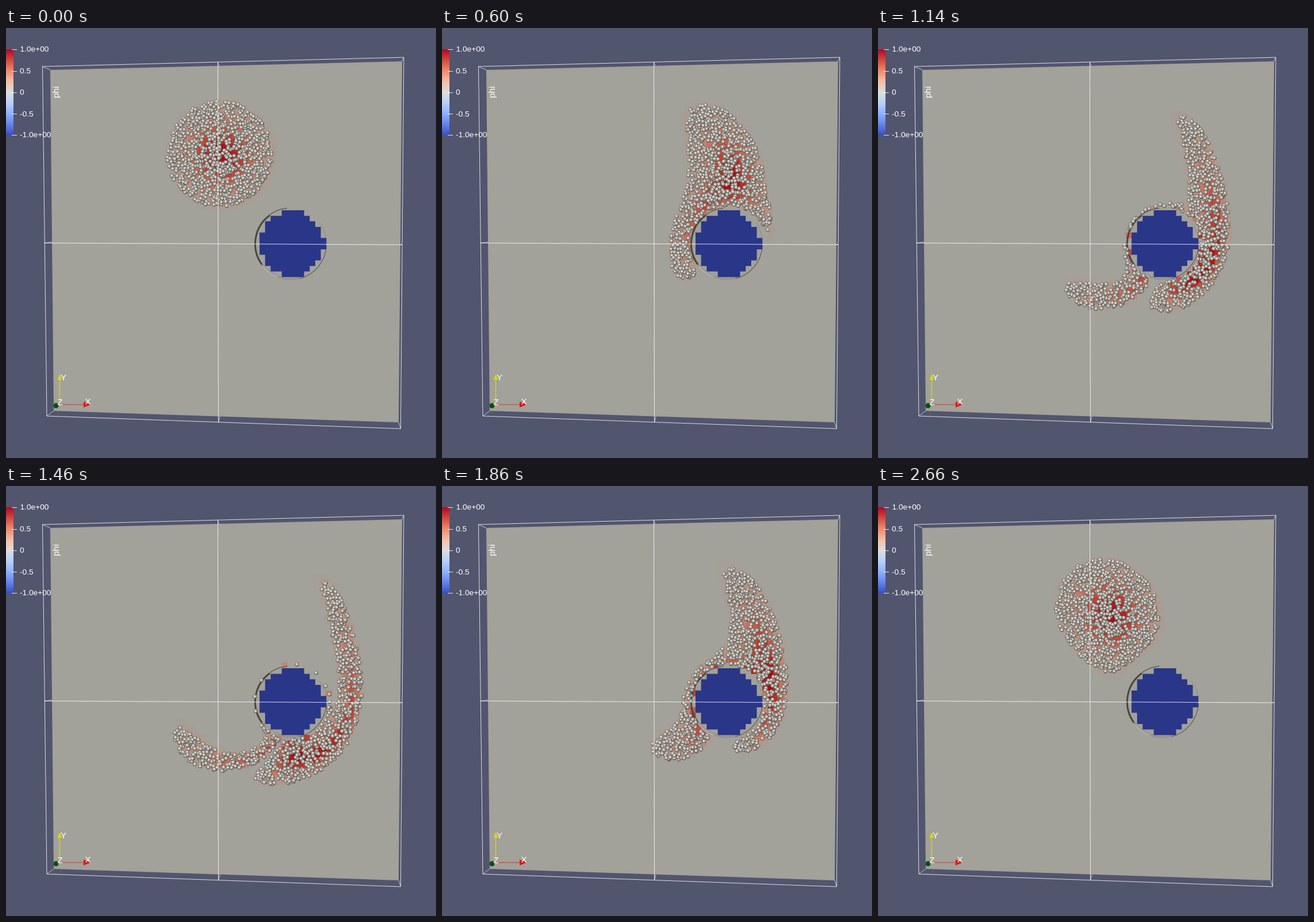
An HTML page with a canvas for the animation above (2.73 s loop, 748 px wide and 748 px high).

```html
<!DOCTYPE html>
<html lang="en">
<head>
<meta charset="utf-8">
<title>phi</title>
<style>
html, body { margin: 0; width: 100%; height: 100%; overflow: hidden; background: #52556e; }
canvas, svg { position: absolute; left: 0; top: 0; width: 748px; height: 748px; display: block; }
text { font-family: "Liberation Sans", Arial, sans-serif; fill: #fff; }
</style>
</head>
<body>
<canvas id="stage" width="748" height="748"></canvas>
<svg viewBox="0 0 748 748">
  <defs>
    <linearGradient id="map" x1="0" y1="0" x2="0" y2="1">
      <stop offset="0" stop-color="#b40426"/>
      <stop offset=".12" stop-color="#d0473d"/>
      <stop offset=".25" stop-color="#f08a6c"/>
      <stop offset=".38" stop-color="#f3c0a8"/>
      <stop offset=".5" stop-color="#dddddd"/>
      <stop offset=".62" stop-color="#b9d0f9"/>
      <stop offset=".75" stop-color="#8db0fe"/>
      <stop offset=".88" stop-color="#6180e9"/>
      <stop offset="1" stop-color="#3b4cc0"/>
    </linearGradient>
  </defs>
  <g fill="none" stroke="#fff" stroke-width="1" stroke-opacity=".8">
    <path d="M63.5 67L692 51L686.500 697L71 675Z"/>
    <path d="M63.5 67L77 73M692 51L689 58M686.500 697L683 686M71 675L83 666" stroke-opacity=".65"/>
    <path d="M368.500 59L369.500 686M67 374L689 377"/>
    <path d="M368 59L371 66M67 374L80 372.500M689 377L685 376M369.500 686L372 676" stroke-opacity=".7"/>
  </g>
  <rect x="0" y="37" width="13" height="150" fill="url(#map)"/>
  <path d="M10 37.500H19M10 75.500H19M10 112.500H19M10 149.500H19M10 186.500H19" stroke="#fff" stroke-opacity=".85"/>
  <g font-size="13.7">
    <text x="24.500" y="40.500">1.0e+00</text>
    <text x="24" y="79">0.5</text>
    <text x="24" y="116">0</text>
    <text x="24" y="153.500">-0.5</text>
    <text x="24" y="189.500">-1.0e+00</text>
    <text font-size="15.500" transform="translate(92 122) rotate(-90)">phi</text>
  </g>
  <path d="M93.500 652V611" stroke="#d6d62a" stroke-width="1.200"/>
  <path d="M89.500 612L93.500 602L97.500 612Z" fill="#d8d80c"/>
  <path d="M91 655H136" stroke="#e03030" stroke-width="1.200"/>
  <path d="M135 650L147 655L135 660Z" fill="#e31010"/>
  <circle cx="87" cy="657" r="4.500" fill="#0b4f12"/>
  <g font-size="15">
    <text x="95" y="613">Y</text>
    <text x="137.500" y="655">X</text>
    <text x="89.500" y="656">Z</text>
  </g>
</svg>
<script>
const ctx = document.getElementById("stage").getContext("2d");
const PI = Math.PI, LOOP = 2730, TURN = 21;
const BALLS = 840, BALL_R = 3.7;
const CELL = 9.66, OBST_X = 0.7, OBST_Y = 0.5, OBST_R = 0.1;

let seed = 20417;
function rand() {
  seed = (seed + 0x6d2b79f5) | 0;
  let z = Math.imul(seed ^ (seed >>> 15), 1 | seed);
  z = (z + Math.imul(z ^ (z >>> 7), 61 | z)) ^ z;
  return ((z ^ (z >>> 14)) >>> 0) / 4294967296;
}

// Clockwise vortex in the unit square, plus a doublet that makes the round
// obstacle a streamline, plus its mirror images in the four walls.
const SLOPE = 0.995 * OBST_R ** 2, BEND = 0.543 * OBST_R ** 4;
const doublets = [];
for (const x of [-OBST_X, OBST_X, 2 - OBST_X]) {
  for (const y of [-OBST_Y, OBST_Y, 2 - OBST_Y]) {
    doublets.push({ x, y, k: y === OBST_Y ? SLOPE : -SLOPE });
  }
}

function flow(x, y) {
  let u = -(Math.sin(PI * x) ** 2) * Math.sin(2 * PI * y);
  let v = Math.sin(2 * PI * x) * Math.sin(PI * y) ** 2;
  for (const d of doublets) {
    const X = x - d.x, Y = y - d.y;
    const r2 = Math.max(X * X + Y * Y, 0.009), s = d.k / (r2 * r2);
    u += 2 * X * Y * s;
    v += (Y * Y - X * X) * s;
  }
  const X = x - OBST_X, Y = y - OBST_Y;
  const bend = 2 * BEND / Math.max(X * X + Y * Y, 0.009) ** 3;
  return [
    u + bend * Y * (Y * Y - 3 * X * X),
    v + bend * X * (X * X - 3 * Y * Y)
  ];
}

function move([x, y], span) {
  const n = 3, h = span / n;
  for (let i = 0; i < n; i++) {
    const a = flow(x, y);
    const b = flow(x + a[0] * h / 2, y + a[1] * h / 2);
    const c = flow(x + b[0] * h / 2, y + b[1] * h / 2);
    const d = flow(x + c[0] * h, y + c[1] * h);
    x += h / 6 * (a[0] + 2 * b[0] + 2 * c[0] + d[0]);
    y += h / 6 * (a[1] + 2 * b[1] + 2 * c[1] + d[1]);
    const X = x - OBST_X, Y = y - OBST_Y, r = Math.hypot(X, Y);
    if (r < OBST_R) {
      x = OBST_X + X * OBST_R / r;
      y = OBST_Y + Y * OBST_R / r;
    }
  }
  return [x, y];
}

const tau = k => 0.0292 * k + 0.00017 * k * k;

// All states of a set of points, carried forward (+1) or back (-1).
function carry(points, dir) {
  const out = [points];
  for (let k = 1; k <= TURN; k++) {
    const span = dir * (tau(k) - tau(k - 1));
    out.push(out[k - 1].map(p => move(p, span)));
  }
  return out;
}

function scatter() {
  const list = [];
  while (list.length < BALLS) {
    const r = 0.146 * Math.sqrt(rand()), a = 2 * PI * rand();
    const x = 0.5 + r * Math.cos(a), y = 0.75 + r * Math.sin(a);
    if (list.every(p => Math.hypot(p[0] - x, p[1] - y) > 0.0042)) list.push([x, y]);
  }
  return list;
}

const cells = [], solid = [];
for (let m = -24; m < 28; m++) {
  for (let j = -26; j < 19; j++) {
    const spot = { x: 499 + CELL * j, y: 375 - CELL * (m + 1) };
    if ((j + 0.7) ** 2 + (m + 0.5) ** 2 < 33.5) solid.push(spot);
    else cells.push({ ...spot, p: [OBST_X + (j + 0.5) / 64, OBST_Y + (m + 0.5) / 64] });
  }
}

const balls = carry(scatter(), 1);
const origins = carry(cells.map(c => c.p), -1);

const RAMP = [[162, 161, 154], [187, 146, 130], [199, 111, 90], [187, 56, 46], [164, 12, 21]];
function tint(v) {
  const s = Math.min(v, 0.999) * 4, i = Math.floor(s), f = s - i;
  return "rgb(" + RAMP[i].map((c, n) => Math.round(c + (RAMP[i + 1][n] - c) * f)) + ")";
}

function makeBall() {
  const c = document.createElement("canvas"), g = c.getContext("2d");
  c.width = c.height = 32;
  const grad = g.createRadialGradient(14, 12.5, 0, 15.5, 15.5, 16);
  grad.addColorStop(0, "#efece6");
  grad.addColorStop(0.42, "#c8c4bc");
  grad.addColorStop(0.78, "#86827b");
  grad.addColorStop(1, "#474440");
  g.fillStyle = grad;
  g.arc(16, 16, 15.5, 0, 2 * PI);
  g.fill();
  return c;
}
const ball = makeBall();

function arc(from, to, width, color) {
  ctx.beginPath();
  ctx.arc(495, 375.5, 63 - width / 2, from * PI, to * PI);
  ctx.lineWidth = width;
  ctx.strokeStyle = color;
  ctx.stroke();
}

function fillCells(list, color) {
  ctx.fillStyle = color;
  ctx.beginPath();
  list.forEach(c => ctx.rect(c.x, c.y, CELL + 0.3, CELL + 0.3));
  ctx.fill();
}

function draw(k) {
  ctx.fillStyle = "#52556e";
  ctx.fillRect(0, 0, 748, 748);
  ctx.fillStyle = "#a2a19a";
  ctx.beginPath();
  [[77, 73], [689, 58], [683, 686], [83, 666]].forEach(p => ctx.lineTo(...p));
  ctx.fill();

  cells.forEach((c, n) => {
    const [x, y] = origins[k][n];
    const phi = 1.12 * (1 - Math.hypot(x - 0.5, y - 0.75) / 0.16);
    if (phi > 0.01) fillCells([c], tint(phi));
  });

  arc(0.4, 0.8, 4, "#96948d");
  arc(0.62, 0.78, 2, "#b4b2aa");
  arc(0.8, 1.3, 3, "#484641");
  arc(1.28, 1.47, 1.2, "#56544f");
  arc(1.8, 2, 0.7, "#85837c");
  arc(0.02, 0.42, 1.1, "#5a5852");
  fillCells(solid, "#2a3688");

  for (const [x, y] of balls[k]) {
    const px = 371.5 + 627 * (x - 0.5), py = 375.5 - 627 * (y - 0.5);
    ctx.drawImage(ball, px - BALL_R, py - BALL_R, 2 * BALL_R, 2 * BALL_R);
  }
}

// 15 pictures a second on a 20 ms clock; the flow reverses at TURN.
let shown = -1;
function tick() {
  const t = performance.now() % LOOP;
  const i = Math.min(40, Math.floor((Math.floor(t / 20) + 0.5) * 0.3));
  const k = i <= TURN ? i : 2 * TURN - i;
  if (k !== shown) draw(shown = k);
  requestAnimationFrame(tick);
}
tick();
</script>
</body>
</html>
```
